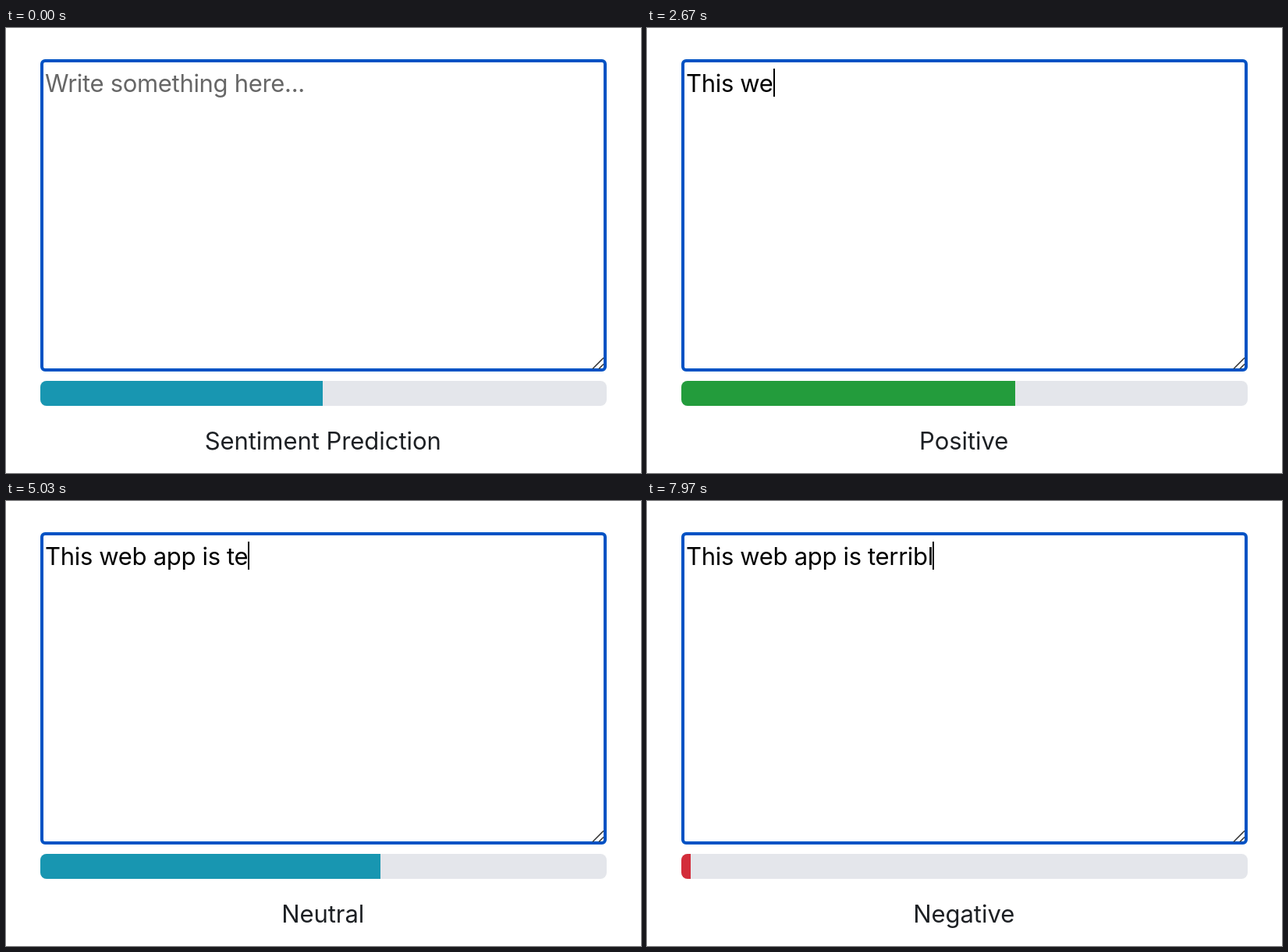
An HTML page that plays this animation: 814 by 570 pixels, repeating every 8000 ms.

```html
<!DOCTYPE html>
<html lang="en">
<head>
<meta charset="utf-8">
<title>Sentiment Prediction</title>
<style>
  html, body { margin: 0; width: 100%; height: 100%; overflow: hidden; background: #fff; }
  svg { display: block; width: 814px; height: 570px; }
  text {
    font: 400 31px Inter, "Liberation Sans", sans-serif;
    font-optical-sizing: none;
    white-space: pre;
  }
  #typed, #hint { letter-spacing: -.32px; }
  #hint { fill: #676767; }
  #label { letter-spacing: -.05px; text-anchor: middle; fill: #1d2024; }
</style>
</head>
<body>
<svg viewBox="0 0 814 570">
  <clipPath id="track"><rect x="44" y="452" width="726" height="32" rx="8"/></clipPath>
  <rect x="46" y="42" width="722" height="396" rx="4" fill="#fff" stroke="#0052c4" stroke-width="4"/>
  <path d="M752 436.5 766 422.5M760 436.5 766 430.5" stroke="#404040" stroke-width="1.6"/>
  <text id="hint" x="50" y="82">Write something here...</text>
  <text id="typed" x="50" y="82"></text>
  <rect id="caret" y="52" width="2" height="36"/>
  <g clip-path="url(#track)">
    <rect x="44" y="452" width="726" height="32" fill="#e4e6eb"/>
    <rect id="bar" x="44" y="452" height="32"/>
  </g>
  <text id="label" x="406.2" y="540">Sentiment Prediction</text>
</svg>
<script>
const LOOP = 8000, LATENCY = 40, TRANSITION = 600, BLINK = 500;
const FIRST_CARET = 430, DELETE_AT = 7970, START_WIDTH = 362;
const MESSAGE = 'This web app is terrible';

// One [time, bar width] prediction per typed character.
const predictions = [
  [940, 270], [1222, 603], [1420, 624], [1570, 620], [1830, 408],
  [2610, 617], [2690, 667], [2880, 421], [3060, 450],
  [3260, 508], [3400, 610], [3540, 436], [3700, 591],
  [3880, 590], [4210, 520], [4420, 470],
  [4700, 380], [4930, 500], [5130, 330], [5260, 330],
  [5375, 250], [5490, 230], [5630, 290], [5770, 12]
];
const keyTimes = predictions.map(([time]) => time - LATENCY);

const moods = {
  start: ['Sentiment Prediction', '#1896b1'],
  neutral: ['Neutral', '#1896b1'],
  positive: ['Positive', '#239c3c'],
  negative: ['Negative', '#d32d3a']
};
const moodOf = width => width > 600 ? 'positive' : width < 100 ? 'negative' : 'neutral';

const [hint, typed, caret, bar, label] =
  ['hint', 'typed', 'caret', 'bar', 'label'].map(id => document.getElementById(id));

// CSS "ease": cubic-bezier(.25, .1, .25, 1)
function ease(x) {
  if (x >= 1) return 1;
  const bezier = (a, b, s) => 3 * a * s * (1 - s) ** 2 + 3 * b * s * s * (1 - s) + s ** 3;
  let low = 0, high = 1;
  for (let i = 0; i < 24; i++) {
    const mid = (low + high) / 2;
    if (bezier(.25, .25, mid) < x) low = mid; else high = mid;
  }
  return bezier(.1, 1, low);
}

// Each prediction restarts the transition from wherever the bar is.
function barState(now) {
  let width = START_WIDTH, mood = 'start';
  predictions.forEach(([time, target], i) => {
    if (now < time) return;
    const next = predictions[i + 1];
    const end = next ? Math.min(now, next[0]) : now;
    width += (target - width) * ease((end - time) / TRANSITION);
    mood = moodOf(target);
  });
  return { width, mood };
}

function caretVisible(now, count) {
  if (!count) return now >= FIRST_CARET;
  const lastKey = now >= DELETE_AT ? DELETE_AT : keyTimes[count - 1];
  return Math.floor((now - lastKey) / BLINK) % 2 === 0;
}

function setText(node, value) {
  if (node.textContent !== value) node.textContent = value;
}

function draw(now) {
  const count = keyTimes.filter(time => time <= now).length;
  setText(typed, MESSAGE.slice(0, now >= DELETE_AT ? count - 1 : count));
  hint.style.display = count ? 'none' : '';
  caret.style.display = caretVisible(now, count) ? '' : 'none';
  caret.setAttribute('x', 50 + (count ? Math.round(typed.getComputedTextLength() / 2) * 2 : 0));

  const { width, mood } = barState(now);
  const [name, color] = moods[mood];
  bar.setAttribute('width', Math.round(width / 2) * 2);
  bar.setAttribute('fill', color);
  setText(label, name);
}

const began = performance.now();
function tick() {
  draw((performance.now() - began) % LOOP);
  requestAnimationFrame(tick);
}
tick();
</script>
</body>
</html>
```
